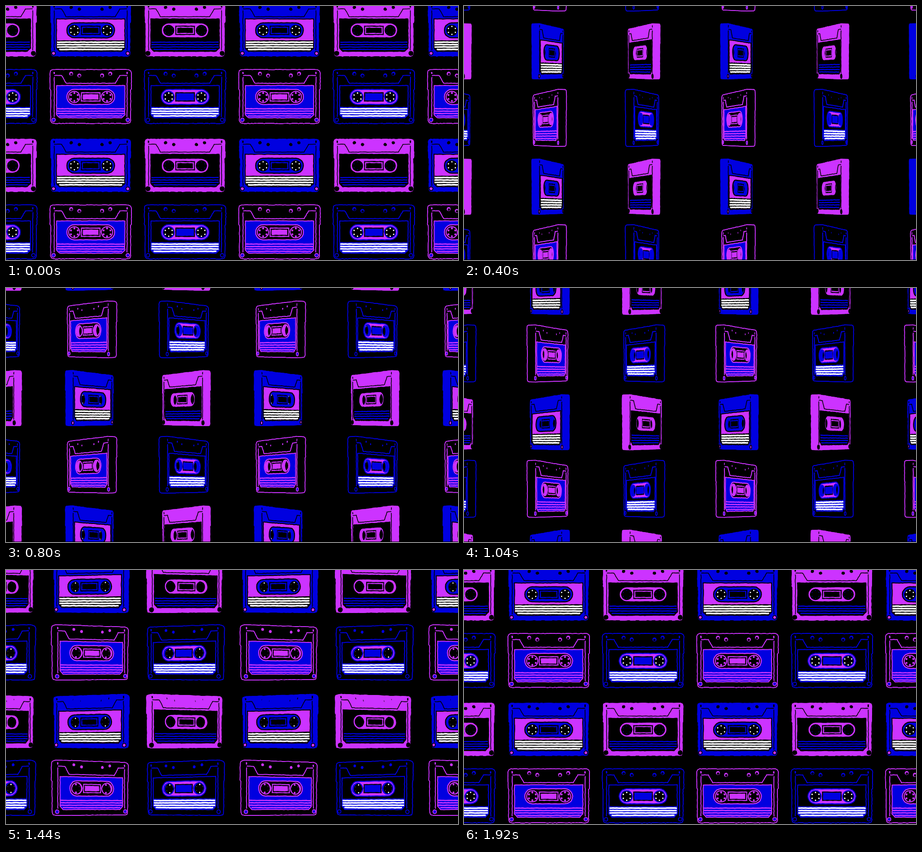
These frames come from a looping animation (998 by 561 pixels, 2 s). An HTML page with a canvas:

```html
<!DOCTYPE html>
<html lang="en">
<head>
<meta charset="utf-8">
<title>Cassettes</title>
<style>
  html, body { margin: 0; width: 100%; height: 100%; overflow: hidden; background: #000; }
  canvas { display: block; }
</style>
</head>
<body>
<canvas id="stage" width="998" height="561"></canvas>
<script>
const ctx = document.getElementById('stage').getContext('2d');
const W = 998, H = 560;
const K = '#000', B = '#0000e0', P = '#cc33ff', WH = '#fff';

const LOOP = 2000, STEP = 80;
const PITCH_X = 208.4, PITCH_Y = 299;
const CAMERA = 1250, HORIZON = 40;
const DEPTH = 15, FRONT = DEPTH / 2;

// Keys: [step, value, speed per step]
const SCROLL = [[0, 0, 0], [3, 11.5, 10], [7, 110, 32], [13, 246, 12.5], [16, 271, 6.2], [20, 290, 3.2], [24, PITCH_Y, 1]];
const SPIN = [[0, 0, 2], [3, 20, 17], [7, 143, 38], [13, 295, 13], [16, 324, 7.2], [20, 346, 4.4], [24, 360, 2]];

const STYLES = {
  solidBlue: {
    main: B, solid: true, line: K, lineW: 1.6, label: P, band: K, stripe: WH, stripeW: 3.4,
    pill: B, pillEdge: K, hubRing: null, teeth: WH, toothR: 1.5, win: [K, B, K], screw: P, screwEdge: K
  },
  solidPink: {
    main: P, solid: true, line: K, lineW: 1.6, label: K, band: K, stripe: B, stripeW: 2.4,
    pill: P, pillEdge: K, hubRing: null, teeth: B, toothR: .8, win: [K, P, K], screw: K, screwEdge: K
  },
  linePink: {
    main: P, solid: false, line: P, lineW: 2, label: B, band: B, stripe: P, stripeW: 2.6,
    pill: K, pillEdge: P, hubRing: P, teeth: P, toothR: 2.2, win: [P, K, P], screw: B, screwEdge: P
  },
  lineBlue: {
    main: B, solid: false, line: B, lineW: 2, label: K, band: B, stripe: WH, stripeW: 3.4,
    pill: P, pillEdge: B, hubRing: B, teeth: WH, toothR: 1.6, win: [K, B], screw: K, screwEdge: B
  }
};

// Shapes in cassette space, centred on 0,0
const mirror = pts => [...pts, ...pts.map(([x, y]) => [-x, y]).reverse()];
const box = (w, h) => [[-w, -h], [w, -h], [w, h], [-w, h]];
const arc = (cx, cy, r, from, to, n) => Array.from({ length: n }, (_, i) => {
  const a = from + (to - from) * i / (n - 1);
  return [cx + r * Math.cos(a), cy + r * Math.sin(a)];
});
const circle = (cx, cy, r) => arc(cx, cy, r, 0, Math.PI * 2 * 15 / 16, 16);

const BODY = mirror([[83, -58], [87, -56], [88.3, -52], [88.3, -17], [86.7, -14], [86.7, 53], [85, 57], [81, 58]]);
const LABEL = mirror([[75, -24], [75, 40], [68, 47]]);
const BAND = mirror([[74, 23], [74, 40], [68, 46]]);
const PILL = mirror(arc(36, 1, 16.5, -Math.PI / 2, Math.PI / 2, 11));
const TRAPEZOID = mirror([[80, -46], [64, -46], [54, -29]]);

let sin = 0, cos = 1, seed = 1;

const random = () => (seed = seed * 16807 % 2147483647) / 2147483647;

function project(x, y, z) {
  const k = CAMERA / (CAMERA + x * sin - z * cos);
  return [(x * cos + z * sin) * k, HORIZON + (y - HORIZON) * k];
}

// Builds a path whose edges wobble like rough ink
function trace(pts, { z = FRONT, open = false, rough = .9 } = {}) {
  ctx.beginPath();
  const last = open ? pts.length - 1 : pts.length;
  for (let i = 0; i < last; i++) {
    const [ax, ay] = pts[i], [bx, by] = pts[(i + 1) % pts.length];
    const n = Math.max(1, Math.round(Math.hypot(bx - ax, by - ay) / 4));
    for (let j = 0; j < n + (open ? 1 : 0); j++) {
      const u = j / n;
      const [x, y] = project(ax + (bx - ax) * u, ay + (by - ay) * u, z);
      ctx.lineTo(x + (random() - .5) * rough * (.4 + .6 * cos), y + (random() - .5) * rough);
    }
  }
  if (!open) ctx.closePath();
}

function fill(pts, color, opts) {
  trace(pts, opts);
  ctx.fillStyle = color;
  ctx.fill();
}

function stroke(pts, color, width, opts) {
  trace(pts, opts);
  ctx.strokeStyle = color;
  ctx.lineWidth = width;
  ctx.stroke();
}

// An opening whose side wall shows when the shell turns
function hole(x, y, r, inner, depth, wall, inside) {
  const soft = { rough: .6 };
  fill(circle(x, y, r), wall, soft);
  ctx.save();
  trace(circle(x, y, r), soft);
  ctx.clip();
  fill(circle(x, y, inner), K, { z: FRONT - depth, rough: .6 });
  if (inside) inside();
  ctx.restore();
}

function shell(s) {
  const start = seed, slices = 7;
  const sweep = draw => {
    for (let i = 0; i <= slices; i++) {
      seed = start;
      draw({ z: -FRONT + DEPTH * i / slices });
    }
  };
  if (!s.solid) sweep(opts => stroke(BODY, s.main, 3.8, opts));
  sweep(opts => fill(BODY, s.solid ? s.main : K, opts));
}

function hub(x, s) {
  hole(x, 1, 12.5, 12.5, 7, s.main, () => {
    for (let i = 0; i < 6; i++) {
      const a = (i + .5) * Math.PI / 3;
      // Teeth at the sides sink out of sight as the shell turns
      const r = s.toothR * (1 - Math.abs(Math.cos(a)) * Math.min(1, 2 * Math.abs(sin)));
      fill(circle(x + 8.7 * Math.cos(a), 1 + 8.7 * Math.sin(a), r), s.teeth, { z: FRONT - 5, rough: .4 });
    }
  });
  if (s.hubRing) stroke(circle(x, 1, 12.5), s.hubRing, 2.2, { rough: .7 });
}

function cassette(s) {
  shell(s);

  stroke(TRAPEZOID, s.line, s.lineW, { open: true });
  const shrink = 1 - .6 * Math.abs(sin);
  for (const side of [-1, 1]) {
    stroke([[80 * side, -43], [80 * side, 45]], s.line, s.lineW, { open: true });
    stroke([[80 * side, -54], [80 * side, -49]], s.line, 3 * Math.max(.5, cos), { open: true });
    for (const [x, y] of [[43, -50], [25, -46]]) {
      if (s.solid) hole(x * side, y, 4, 4, DEPTH, s.main);
      else hole(x * side, y, 4.4 * shrink, 2.6 * shrink, DEPTH, s.main);
    }
    const r = s.screw === K && s.solid ? 4.6 : 4;
    fill(circle(81.5 * side, 51.5, r), s.screw, { rough: .6 });
    stroke(circle(81.5 * side, 51.5, r), s.screwEdge, 1.7, { rough: .6 });
  }

  fill(LABEL, s.label);
  fill(BAND, s.band);
  for (let i = 0; i < 4; i++) {
    const y = 27 + 5.3 * i, x = i === 3 ? 69 : 74;
    stroke([[-x, y], [x, y]], s.stripe, s.stripeW, { open: true, rough: .7 });
  }
  stroke(LABEL, s.line, 2);

  fill(PILL, s.pill, { rough: .7 });
  stroke(PILL, s.pillEdge, 2.3, { rough: .7 });
  hub(-36, s);
  hub(36, s);
  s.win.forEach((color, i) => {
    const rect = box(21.5 - 2.2 * i, 10.2 - 2.2 * i).map(([x, y]) => [x, y + 1]);
    fill(rect, color, { rough: .7 });
  });
}

// Cubic Hermite between keys
function ease(keys, step) {
  let i = 0;
  while (i < keys.length - 2 && step > keys[i + 1][0]) i++;
  const [a, va, sa] = keys[i], [b, vb, sb] = keys[i + 1];
  const d = b - a, u = (step - a) / d, u2 = u * u, u3 = u2 * u;
  return va * (2 * u3 - 3 * u2 + 1) + vb * (3 * u2 - 2 * u3)
    + d * (sa * (u3 - 2 * u2 + u) + sb * (u3 - u2));
}

function place(name, x, y, angle, step) {
  if (y < -75 || y > H + 75) return;
  const a = STYLES[name].main === B ? angle : -angle;
  sin = Math.sin(a);
  cos = Math.cos(a);
  seed = 4021 + step * 977 + name.length * 131;
  ctx.save();
  ctx.translate(x, y);
  cassette(STYLES[name]);
  ctx.restore();
}

function draw(step) {
  const scroll = ease(SCROLL, step);
  const turn = ease(SPIN, step);
  // Both faces look alike, so half turns drop out
  const angle = (turn - 180 * Math.round(turn / 180)) * Math.PI / 180;

  ctx.fillStyle = K;
  ctx.fillRect(0, 0, W, H + 1);
  ctx.save();
  ctx.beginPath();
  ctx.rect(0, 0, W, H);
  ctx.clip();
  ctx.lineJoin = 'round';
  for (let row = -2; row <= 1; row++) {
    const y = row * PITCH_Y + scroll;
    for (let col = -1; col <= 4; col++) {
      const x = 187 + col * PITCH_X, even = col % 2 === 0;
      place(even ? 'solidBlue' : 'solidPink', x, 352 + y, angle, step);
      place(even ? 'linePink' : 'lineBlue', x, 200 + y, angle, step);
    }
  }
  ctx.restore();
}

const begin = performance.now();
let shown = -1;

function tick() {
  const step = Math.floor((performance.now() - begin) % LOOP / STEP);
  if (step !== shown) draw(shown = step);
  requestAnimationFrame(tick);
}
tick();
</script>
</body>
</html>
```
